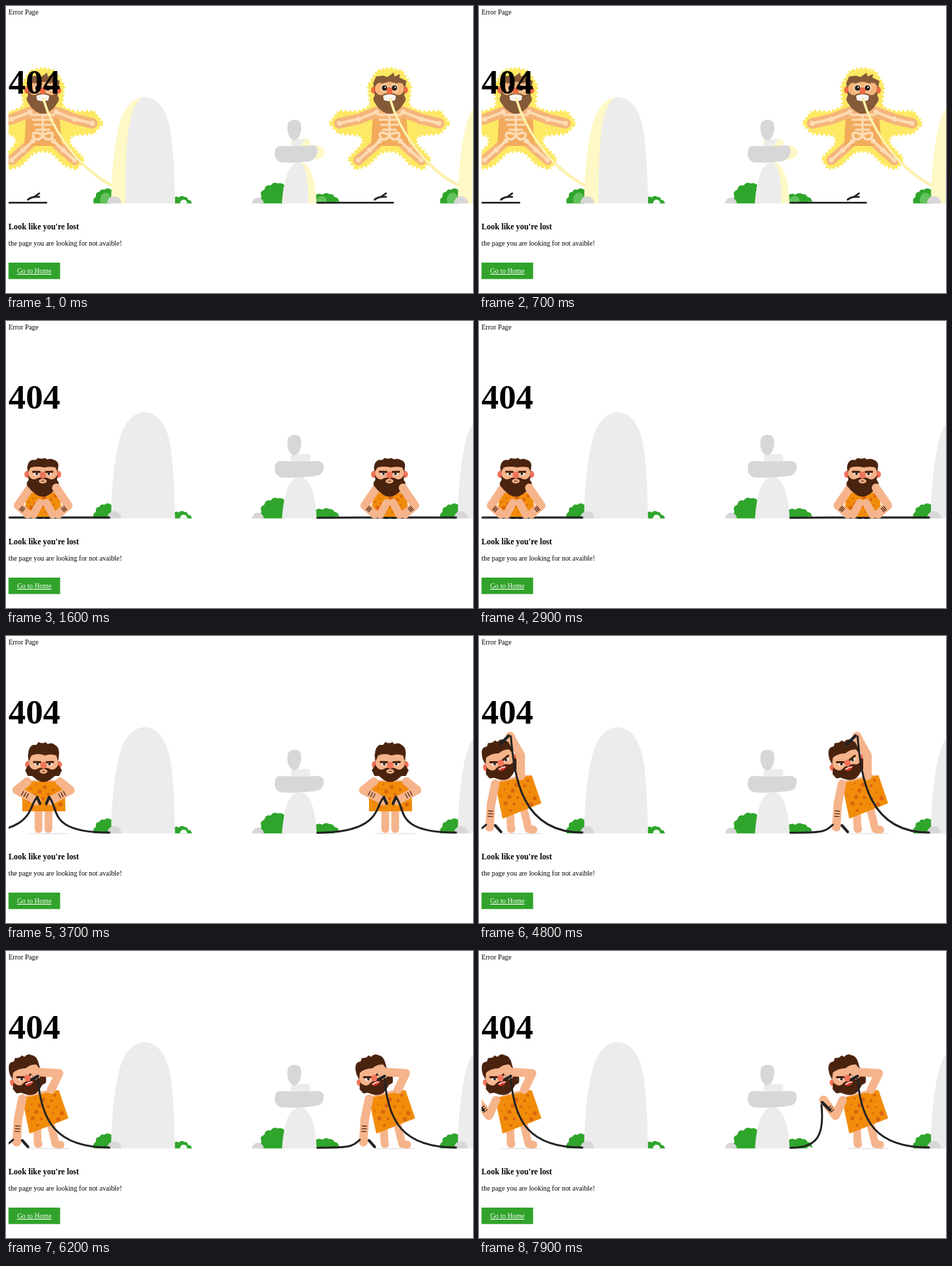
These frames come from a looping animation (660x406 px, 8 s). An HTML page with a canvas:

```html
<!DOCTYPE html>
<html lang="en">
<head>
<meta charset="utf-8">
<title>Error Page</title>
<style>
html, body { margin: 0; width: 660px; height: 406px; overflow: hidden; background: #fff; }
canvas, svg { position: absolute; left: 0; top: 0; }
text { font: 9.83px "Liberation Serif", "Times New Roman", serif; }
</style>
</head>
<body>
<canvas width="660" height="406"></canvas>
<svg width="660" height="406">
  <text x="3.5" y="12.4">Error Page</text>
  <text x="3.5" y="124" style="font-size:48.8px;font-weight:bold">404</text>
  <text x="3.5" y="315.5" style="font-size:11.42px;font-weight:bold">Look like you're lost</text>
  <text x="3.5" y="339">the page you are looking for not avaible!</text>
  <rect x="3.5" y="363" width="73" height="23.3" fill="#31a32b"/>
  <text x="15.7" y="378" fill="#fff" text-decoration="underline">Go to Home</text>
</svg>
<script>
const g = document.querySelector('canvas').getContext('2d');
g.lineCap = g.lineJoin = 'round';

const LOOP = 8000, STEP = 100, TILE = 490, SHOCK_END = 1000;
const GREEN = '#2fa52b', PALE = '#ececec', STONE = '#d7d7d7', LIGHT = '#fdf8c6', CABLE = '#222';
const NORMAL = { skin: '#f5b48b', hair: '#4a230f', pelt: '#f18c0b', spot: '#dc640d', red: '#f0735a', limb: 12 };
const GLOWING = { skin: '#f5b57a', hair: '#855a38', pelt: '#f2aa5c', spot: '#f2aa5c', red: '#ee6a43', limb: 15 };

// head: x, y, tilt, beard half width, beard bottom, hair height
// limbs: three joints; cables: curve points; plugs: two ends
const stand = {
  head: [53, 181, 0, 26, 25, 1], pelt: [24, 207, 82, 207, 83, 247, 24, 247],
  armL: [30, 206, 15, 218, 43, 233], armR: [76, 206, 91, 218, 63, 233],
  legL: [46, 246, 46, 260, 46, 273], legR: [60, 246, 60, 260, 60, 273],
  cableL: [42, 278, 31, 240, 44, 228], cableR: [61, 228, 76, 245, 58, 278],
  plugL: [44, 228, 48, 237], plugR: [61, 228, 57, 237]
};
const flatCable = {
  cableL: [-20, 278, 20, 278, 53, 278], cableR: [53, 278, 80, 278, 110, 278],
  plugL: [46, 278, 50, 278], plugR: [56, 278, 60, 278]
};
const sit = {
  ...flatCable, head: [52, 216, 0, 20, 32, .72], pelt: [30, 244, 75, 244, 78, 276, 27, 276],
  armL: [34, 236, 17, 261, 31, 273], armR: [71, 236, 88, 261, 74, 273],
  legL: [48, 257, 42, 268, 39, 274], legR: [57, 257, 63, 268, 66, 274]
};
const jump = {
  ...flatCable, head: [52, 113, 0, 20, 34, 1], pelt: [26, 160, 72, 152, 81, 184, 22, 184],
  armL: [33, 147, 11, 127, -11, 133], armR: [72, 146, 92, 126, 114, 131],
  legL: [27, 182, 28, 203, 35, 202], legR: [72, 182, 97, 190, 101, 184]
};
const shock = {
  ...jump, head: [52, 118, 0, 21, 34, .7], pelt: [29, 160, 75, 160, 78, 197, 27, 197],
  armL: [34, 150, 8, 160, -19, 166], armR: [71, 150, 97, 160, 122, 166],
  legL: [38, 191, 24, 204, 8, 218], legR: [67, 191, 81, 204, 97, 218]
};
const reach = {
  head: [30, 178, -20, 25, 26, 1], pelt: [24, 209, 74, 198, 87, 236, 34, 257],
  armL: [23, 209, 17, 238, 15, 270], armR: [59, 198, 59, 169, 44, 142],
  legL: [44, 250, 45, 273, 46, 273], legR: [63, 244, 70, 273, 77, 274],
  cableL: [-5, 278, -2, 278, 10, 267], cableR: [45, 142, 50, 200, 60, 278],
  plugL: [23, 268, 31, 277], plugR: [42, 141, 30, 153]
};
const bite = {
  ...reach, armR: [64, 196, 75, 173, 41, 171],
  cableR: [45, 181, 50, 240, 70, 278], plugR: [45, 177, 36, 182]
};
const lift = {
  ...bite, armL: [24, 211, 14, 233, -3, 211],
  cableL: [-10, 279, -2, 258, -6, 218], plugL: [-5, 214, 6, 225]
};
const keys = [[0, shock], [999, shock], [1000, jump], [1250, jump], [1600, sit], [3000, sit], [3400, stand],
  [4300, stand], [4700, reach], [5400, reach], [5800, bite], [6600, bite], [7200, lift], [LOOP, lift]];
const blinks = [1900, 2000, 2300, 2400, 3900, 4200, 5200];

function poseAt(t) {
  const i = keys.findIndex(k => k[0] > t);
  const [t0, a] = keys[i - 1], [t1, b] = keys[i];
  const u = (t - t0) / (t1 - t0), k = u * u * (3 - 2 * u);
  return Object.fromEntries(Object.keys(a).map(n => [n, a[n].map((v, j) => v + (b[n][j] - v) * k)]));
}

function fill(color, path) { g.fillStyle = color; g.fill(new Path2D(path)); }
function line(color, width, path) {
  g.strokeStyle = color; g.lineWidth = width; g.stroke(new Path2D(path));
}
function oval(color, x, y, rx, ry = rx) {
  g.fillStyle = color; g.beginPath(); g.ellipse(x, y, rx, ry, 0, 0, 7); g.fill();
}
const poly = p => 'M' + p.join(' ');

function scenery(lit) {
  g.save();
  g.beginPath(); g.rect(-60, 0, 700, 279.3); g.clip();
  fill(GREEN, 'M124 280Q122 272 127 270Q126 263 132 263Q134 258 139 260Q143 256 149 260V280Z');
  fill(GREEN, 'M238 271Q241 268 244 271Q248 267 252 270Q257 270 257 274Q262 274 263 280H238Z');
  fill(GREEN, 'M360 280Q358 274 361 270Q358 262 365 260Q367 252 374 254Q378 248 384 251Q390 249 394 254V280Z');
  fill(GREEN, 'M438 267Q443 264 447 267Q452 263 457 266Q463 266 464 270Q470 271 470 275Q473 278 468 280H438Z');
  oval('#fff', 251, 279, 5);
  if (lit) {
    oval('#62c25c', 141, 274, 8, 10);
    oval('#62c25c', 446, 275, 7, 6);
  }
  oval('#fff', 467, 280, 3.5);
  const rock = 'M148.5 280C149 235 153 195 161 165C168 142 181 129 196 129C212 129 224 143 230 165C237 195 238 240 239 280Z';
  fill(lit ? LIGHT : PALE, rock);
  if (lit) fill(PALE, 'M169 280C169 230 170 185 176 160C180 142 187 133 193 129Q220 128 230 165C237 195 238 240 239 280Z');
  oval(STONE, 153, 279, 10);
  oval(STONE, 356, 280, 8.5, 9);
  fill(lit ? LIGHT : PALE, 'M390 280C392 250 398 221 415 221C431 221 438 250 439 280Z');
  if (lit) {
    fill(PALE, 'M390 280C392 250 398 221 415 221C424 224 428 250 427 280Z');
    oval(LIGHT, 438, 207, 12, 10);
  }
  fill(lit ? LIGHT : PALE, 'M404 189Q416 188 427 188Q431 190 430 196L428 199L403 198Q401 192 404 189Z');
  if (lit) fill(PALE, 'M404 189L424 188L416 198L403 198Z');
  fill(STONE, lit ? 'M386 198Q410 199 436 197Q443 201 439 211Q434 220 426 220Q405 223 387 221Q378 216 380 206Q381 199 386 198Z'
    : 'M386 198Q414 199 442 198Q450 200 449 208Q448 218 438 219Q410 223 387 221Q378 216 380 206Q381 199 386 198Z');
  if (lit) oval(LIGHT, 411, 172, 6, 9);
  fill(STONE, 'M399 165Q402 161 408 161Q416 161 417 168Q418 176 415 183Q412 190 407 190Q400 188 398 178Q397 170 399 165Z');
  g.restore();
}

function limb(color, p, width) { line(color, width, poly(p)); }

function arm(c, p, bands) {
  limb(c.skin, p, c.limb);
  oval(c.skin, p[4], p[5], 6.5);
  if (!bands) return;
  const dx = p[4] - p[2], dy = p[5] - p[3], n = 3.2 / Math.hypot(dx, dy);
  for (const f of [.3, .42, .54]) {
    const x = p[2] + dx * f, y = p[3] + dy * f;
    line(c.hair, 1.2, poly([x - dy * n, y + dx * n, x + dy * n, y - dx * n]));
  }
}

function body(c, p) {
  const q = p.pelt;
  fill(c.skin, poly([p.armL[0] - 4, p.armL[1] - 2, p.armR[0] + 4, p.armR[1] - 2, q[2], q[3], q[4], q[5], q[6], q[7], q[0], q[1]]));
  fill(c.pelt, poly(q) + 'Z');
  line(c.pelt, 2, poly(q) + 'Z');
  for (let i = 0; i < 18; i++) {
    const u = .06 + (.3 + i * .618) % 1 * .88, v = .07 + i / 17 * .86;
    const at = k => (q[k] * (1 - u) + q[k + 2] * u) * (1 - v) + (q[6 + k] * (1 - u) + q[4 + k] * u) * v;
    oval(c.spot, at(0), at(1), 1.3 + i % 3 * .8);
  }
}

function head(c, p, t) {
  const [x, y, tilt, w, b, hairH] = p.head;
  const shocked = t < SHOCK_END, spiky = t < 1400, closed = blinks.includes(t);
  const angry = tilt < -8 ? 1.5 : 0;
  g.save();
  g.translate(x, y); g.rotate(tilt * Math.PI / 180);
  oval(c.red, -22, 1, 4, 5); oval(c.red, 22, 1, 4, 5);
  fill(c.skin, 'M-20 -10Q-19 -17 0 -17Q19 -17 20 -10V16H-20Z');
  g.save();
  g.scale(1, hairH);
  fill(c.hair, spiky
    ? 'M-22 -3L-23 -13L-19 -26L-9 -28L-3 -25L6 -34L7 -26L15 -31L14 -24L24 -17L22 -3L18 -12Q0 -19 -17 -12Z'
    : 'M-21 -3L-22 -12Q-21 -25 -15 -27L-10 -27L-7 -31Q-1 -28 3 -31L6 -28Q12 -31 16 -27Q22 -24 22 -16L21 -3L18 -12Q10 -15 2 -12Q-8 -16 -17 -12Z');
  g.restore();
  fill(c.hair, `M-21 1L${-w} 9Q-24 13 -22 17L-16 ${b - 8}L-10 ${b - 3}Q0 ${b + 4} 10 ${b - 3}L16 ${b - 8}L22 17Q24 13 ${w} 9L21 1Q17 9 11 8Q4 4 0 6Q-4 4 -11 8Q-17 9 -21 1Z`);
  for (const s of [-1, 1]) {
    if (shocked) {
      oval('#f9d3ab', s * 7, -2, 6); oval('#2b2118', s * 7, -2, 3.8); oval('#fff', s * 7 + 1, -3, 1);
      line(c.hair, 1.8, `M${s * 4} -11L${s * 11} -9`);
    } else {
      if (!closed) { oval('#fff', s * 9, 0, 3.4, 2.4); oval('#222', s * 8.5, .3, 1.8); }
      line(c.hair, closed ? 1.5 : 3, `M${s * 4.5} ${-2.6 + angry}L${s * 13.5} ${-2.8 - angry}`);
    }
  }
  oval(c.red, 0, 2, 4.3, 5);
  if (shocked) {
    fill('#fff', 'M-9 9Q0 5 9 9L8 15Q0 18 -8 15Z');
    line('#e4dccf', .7, 'M-8 12H8M-4 8V15M0 8V16M4 8V15');
  } else if (tilt < -8) {
    fill('#d6382c', 'M-7 9Q0 6 6 9Q2 14 -5 12Z');
    line('#fff', 1.4, 'M-5 9Q0 8 4 9');
  } else {
    oval(c.skin, 0, 10.5, 5.5, 3.2); line(c.hair, 1, 'M-2 10.5H2');
  }
  g.restore();
}

function glow(t) {
  const half = [[52, 87], [70, 91], [83, 112], [80, 142], [98, 149], [124, 148], [138, 166], [124, 181],
    [92, 184], [90, 194], [111, 216], [100, 232], [82, 226], [64, 208], [52, 206]];
  const ring = half.concat(half.slice(1, -1).reverse().map(([x, y]) => [104 - x, y]));
  const flick = (t / STEP) % 2, out = [];
  ring.forEach(([x, y], i) => {
    const [nx, ny] = ring[(i + 1) % ring.length], dx = nx - x, dy = ny - y, len = Math.hypot(dx, dy);
    const n = Math.max(2, 2 * Math.round(len / 6));
    for (let k = 0; k < n; k++) {
      const f = (k + flick * .5) / n, d = k % 2 ? 2 : -2;
      out.push(x + dx * f + dy / len * d, y + dy * f - dx / len * d);
    }
  });
  fill('#fde963', poly(out) + 'Z');
}

function bones(p) {
  const bone = '#fcdcb6';
  for (const n of ['armL', 'armR', 'legL', 'legR']) {
    limb(bone, p[n], 4);
    for (let k = 0; k < 6; k += 2) oval(bone, p[n][k], p[n][k + 1], 3.5);
  }
  line(bone, 3, 'M52 150V185M36 154H68M38 161H66M40 168H64M43 175H61');
  line(bone, 3.5, 'M51 182Q35 175 39 186Q45 192 51 185M53 182Q69 175 65 186Q59 192 53 185');
}

function cables(p) {
  line(CABLE, 2.8, 'M-50 278.3C' + p.cableL.join(' '));
  const r = p.cableR;
  line(CABLE, 2.8, `M${r.slice(0, 2).join(' ')}C${r.slice(2).join(' ')} 146 278`);
  line(CABLE, 4, poly(p.plugL)); line(CABLE, 4, poly(p.plugR));
}

function caveman(p, t) {
  const lit = t < SHOCK_END, c = lit ? GLOWING : NORMAL, seated = p.head[1] > 203;
  const legs = () => { limb(c.skin, p.legL, c.limb - 1); limb(c.skin, p.legR, c.limb - 1); };
  if (lit) {
    line(CABLE, 2.6, 'M-50 278.3H57');
    line(CABLE, 2.6, 'M31 274Q36 269 47 270M40 270L47 265');
    glow(t);
  } else if (t < 3200) cables(p);
  if (t >= 3300) line('#e4e4e4', 1.5, 'M32 279.5H88');
  if (!seated) legs();
  body(c, p);
  if (seated) legs();
  arm(c, p.armL, !lit);
  if (lit) {
    arm(c, p.armR);
    bones(p);
  }
  head(c, p, t);
  if (!lit) arm(c, p.armR, p.head[2] > -8);
  if (lit) {
    line('#fbe98a', 3.5, 'M53 132C62 165 95 225 148 253');
    line('#fffbd8', 1.2, 'M53 132C62 165 95 225 148 253');
  } else if (t >= 3200) cables(p);
  else if (t < 1500) {
    line(CABLE, 2, 'M34 275Q52 269 73 272M36 273Q50 277 66 275');
    fill('#f3b63c', 'M55 273L58 267L61 273Z');
  }
}

function draw(now) {
  const t = Math.floor(now % LOOP / STEP) * STEP, p = poseAt(t);
  if (t >= 5800) p.head[2] += 1.5 * Math.sin(Math.PI * (t - 6200) / 340);
  g.clearRect(0, 0, 660, 406);
  g.save();
  g.beginPath(); g.rect(3.7, 0, 657, 406); g.clip();
  for (const x of [0, TILE]) {
    g.save();
    g.translate(x, 0);
    scenery(t < SHOCK_END);
    caveman(p, t);
    g.restore();
  }
  g.restore();
  requestAnimationFrame(next);
}
const start = performance.now();
const next = () => draw(performance.now() - start);
next();
</script>
</body>
</html>
```
